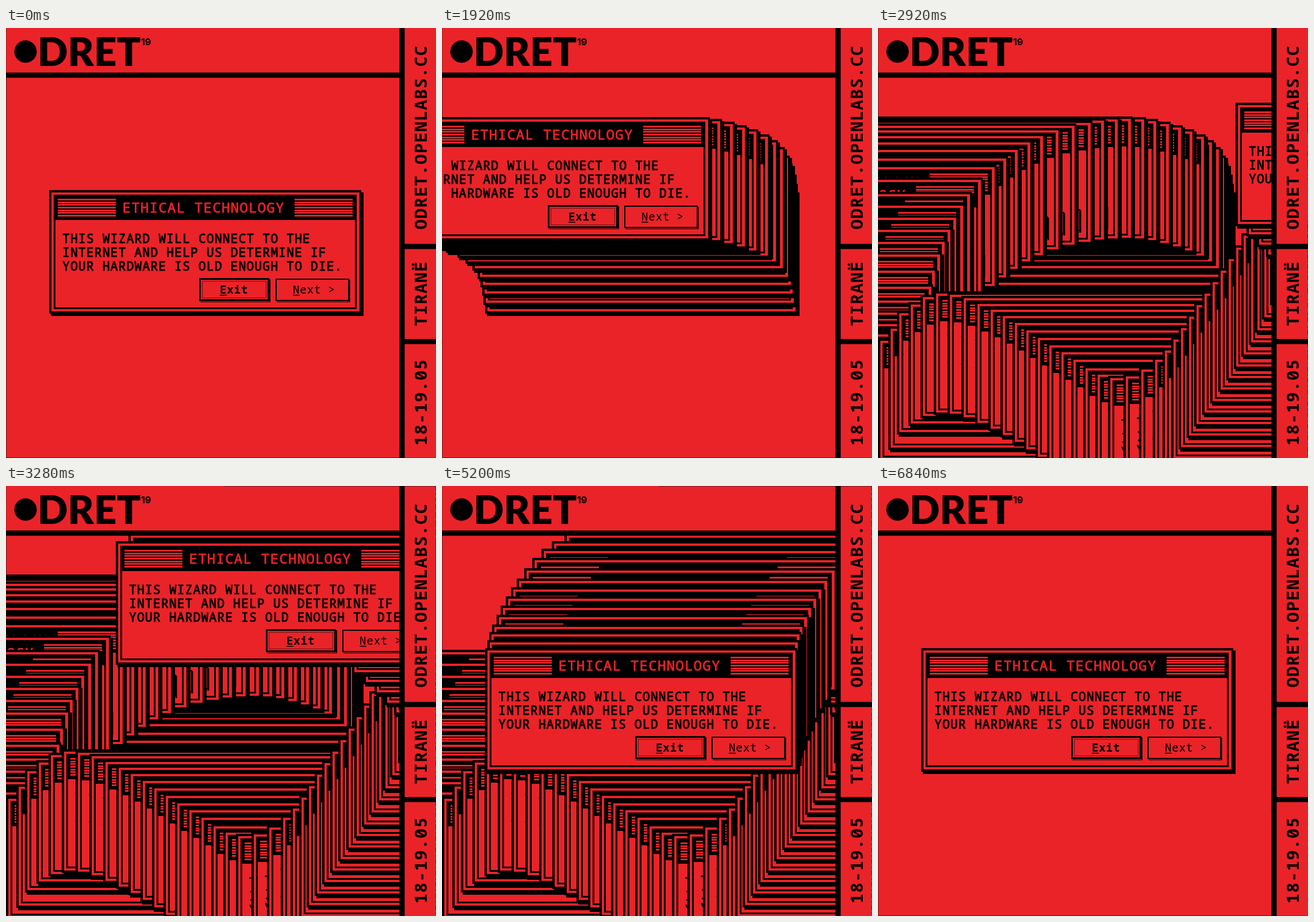
These frames come from a looping animation (748 px wide and 748 px high, 7040 ms). An HTML page with a canvas:

```html
<!DOCTYPE html>
<html lang="en">
<head>
<meta charset="utf-8">
<title>Ethical Technology</title>
<style>
  html, body { margin: 0; width: 100%; height: 100%; overflow: hidden; background: #ea2328; }
  canvas, svg { position: absolute; left: 0; top: 0; width: 748px; height: 748px; display: block; }
  .panel { fill: #ea2328; }
  .side { font: 700 29.3px "Noto Sans Mono", "DejaVu Sans Mono", monospace; letter-spacing: 1.3px; }
  .name { font: 900 69px Lato, sans-serif; }
  .year { font: 800 16px Inter, sans-serif; }
</style>
</head>
<body>
<canvas id="stage" width="748" height="748"></canvas>
<svg viewBox="0 0 748 748">
  <path class="panel" d="M.5 .5H690V80H.5ZM690 .5H747.5V747.5H690Z"/>
  <path d="M0 77.500H685V86.500H0ZM684.500 0H693.500V748H684.500ZM690 375.500H748V384.500H690ZM690 541H748V550H690Z"/>
  <circle cx="34" cy="41" r="19.5"/>
  <text class="name" x="55" y="66">DRET</text>
  <text class="year" x="229" y="29.5">'19</text>
  <g class="side">
    <text transform="translate(732 350.500) rotate(-90)">ODRET.OPENLABS.CC</text>
    <text transform="translate(732 518.500) rotate(-90)">TIRANË</text>
    <text transform="translate(732 726.500) rotate(-90)">18-19.05</text>
  </g>
</svg>
<script>
const RED = '#ea2328', BLACK = '#000';
const LOOP = 7040, FRAME = 40, LIFE = 3000;
const MONO = '"Noto Sans Mono", "DejaVu Sans Mono", monospace';

// Key points of the dialog's top-left corner on its closed route.
const route = [
  [75,282], [62,222], [27,185], [-77,155], [-170,161], [-253,184], [-337,238], [-380,285], [-432,390],
  [-442,470], [-330,550], [0,540], [33,492], [97,458], [192,486], [315,560], [400,605], [478,573],
  [550,478], [656,315], [690,200], [400,2], [191,96], [130,161], [87,241], [75,282]
];
const last = route.length - 1;
const chord = i => Math.hypot(route[i + 1][0] - route[i][0], route[i + 1][1] - route[i][1]);
const along = [0];
for (let i = 0; i < last; i++) along.push(along[i] + chord(i));
const total = along[last];

const slope = (i, k) => {
  const a = Math.max(0, i - 1), b = Math.min(last, i + 1);
  return (route[b][k] - route[a][k]) / (along[b] - along[a]);
};
const pointOn = (i, u) => [0, 1].map(k => {
  const h = chord(i), u2 = u * u, u3 = u2 * u, ease = 3 * u2 - 2 * u3;
  return Math.round(route[i][k] * (1 - ease) + route[i + 1][k] * ease
    + h * (slope(i, k) * (u3 - 2 * u2 + u) + slope(i + 1, k) * (u3 - u2)));
});

// Copies of the dialog lie closer together near both ends of the route.
const stamps = [];
for (let i = 0; i < last; i++) {
  const mid = (along[i] + along[i + 1]) / 2;
  const gap = 14 + 11.5 * Math.min(1, mid / 220, (total - mid) / 220);
  const n = Math.max(1, Math.round(chord(i) / gap));
  for (let j = 0; j < n; j++) {
    stamps.push({ at: along[i] + chord(i) * j / n, pos: pointOn(i, j / n) });
  }
}
stamps.push({ at: total, pos: route[last] });

// Slow start, fast middle, slow end; counts the copies passed so far.
function passed(time) {
  const ease = 1.007 / (1 + Math.exp((2600 - time) / 270)) - 0.001;
  const reach = total * Math.min(1, ease);
  return stamps.filter(s => s.at <= reach).length;
}

function makeDialog() {
  const c = document.createElement('canvas');
  c.width = 547;
  c.height = 219;
  const g = c.getContext('2d');
  g.translate(-75, -282);
  g.lineJoin = 'round';
  const box = (color, x1, y1, x2, y2) => {
    g.fillStyle = color;
    g.fillRect(x1, y1, x2 - x1, y2 - y1);
  };
  const text = (str, x, y, size, { weight = 400, color = BLACK, thicken = 0 } = {}) => {
    g.font = `${weight} ${size}px ${MONO}`;
    g.letterSpacing = `${size * 0.045}px`;
    g.fillStyle = g.strokeStyle = color;
    g.fillText(str, x, y);
    if (thicken) {
      g.lineWidth = thicken;
      g.strokeText(str, x, y);
    }
  };

  box(BLACK, 78, 286, 622, 501);
  box(BLACK, 75, 282, 618, 497);
  box(RED, 79, 286, 615, 493);
  box(BLACK, 83, 290, 610, 489);
  box(RED, 86, 334, 607, 486);

  for (let i = 0; i < 7; i++) {
    const y = Math.round(297 + i * 4.67);
    box(RED, 90, y, 191, y + 3);
    box(RED, 502, y, 603, y + 3);
  }
  text('ETHICAL TECHNOLOGY', 202.5, 321, 24.3, { color: RED, thicken: 0.8 });

  ['THIS WIZARD WILL CONNECT TO THE',
   'INTERNET AND HELP US DETERMINE IF',
   'YOUR HARDWARE IS OLD ENOUGH TO DIE.'
  ].forEach((line, i) => text(line, 98, 373.5 + i * 24, 21.6, { thicken: 0.9 }));

  box(BLACK, 338, 437, 460, 477);
  box(RED, 338, 475, 459, 476);
  box(BLACK, 336, 435, 458, 475);
  box(RED, 339, 438, 455, 472);
  g.lineWidth = 1;
  g.strokeStyle = 'rgba(0,0,0,.55)';
  g.strokeRect(341.5, 440.5, 111, 29);
  text('Exit', 372, 462, 19.1, { weight: 700 });
  box(BLACK, 372, 464, 384, 465.5);

  box(BLACK, 471, 438, 598.5, 477);
  box(RED, 471, 475, 597, 476);
  box(BLACK, 469, 436, 597, 475);
  box(RED, 471, 438, 595, 473);
  text('Next >', 499, 462, 19.1);
  box(BLACK, 499, 464, 511, 465.5);
  return c;
}

const ctx = document.getElementById('stage').getContext('2d');
const dialog = makeDialog();
const start = performance.now();

function draw(now) {
  const elapsed = Math.max(0, now - start) % LOOP;
  const time = Math.floor(elapsed / FRAME) * FRAME;
  ctx.fillStyle = RED;
  ctx.fillRect(0, 0, 748, 748);
  ctx.fillStyle = 'rgba(0,0,0,.5)';
  ctx.fillRect(0, 0, 1, 748);
  ctx.fillRect(1, 747, 747, 1);
  // Each copy vanishes LIFE ms after it appeared; one always stays.
  const first = Math.min(passed(time - LIFE), stamps.length - 1);
  const end = Math.max(1, passed(time));
  for (let i = first; i < end; i++) ctx.drawImage(dialog, ...stamps[i].pos);
  requestAnimationFrame(draw);
}
draw(start);
</script>
</body>
</html>
```
